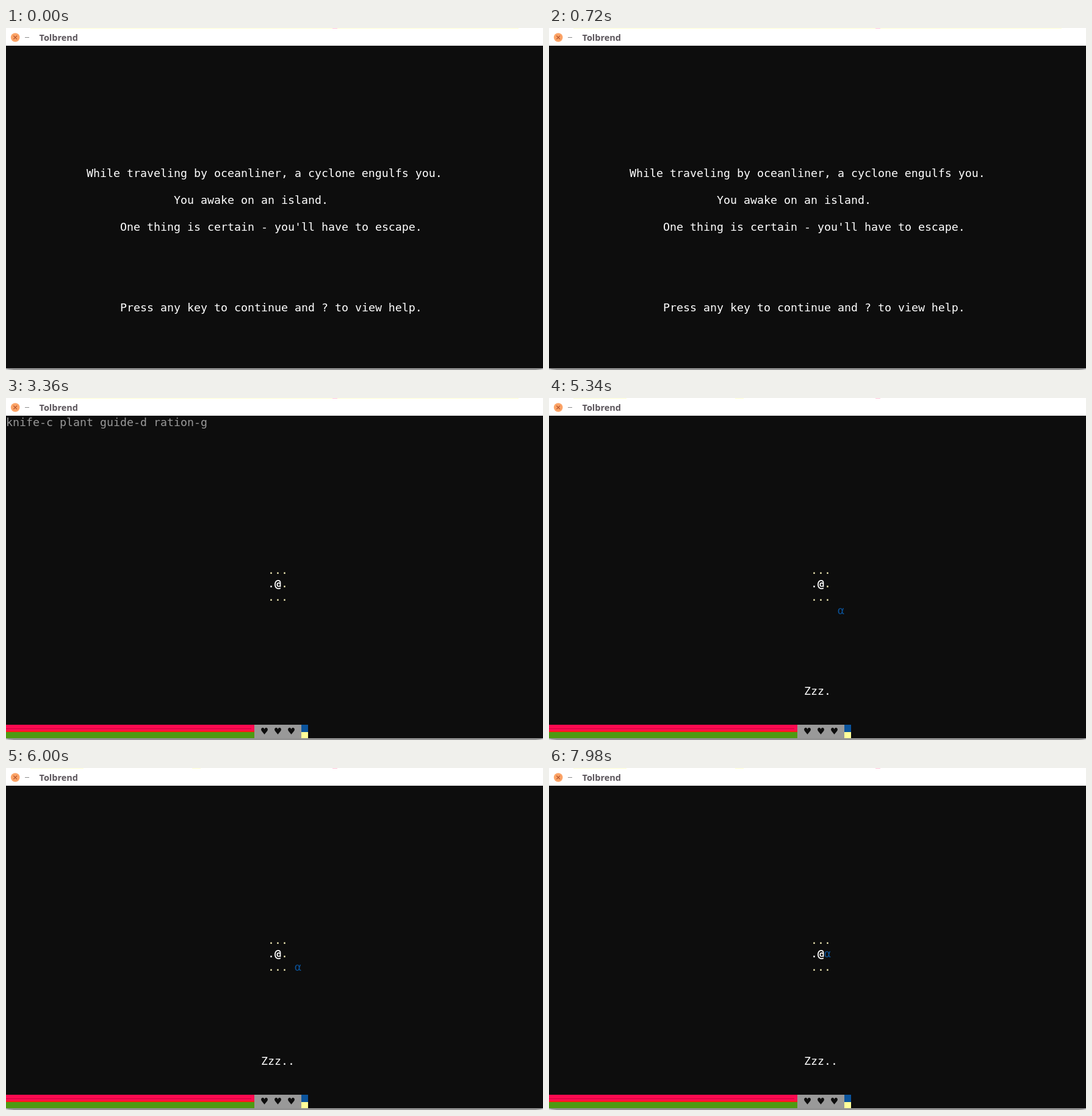
Write an HTML page that moves like this. It is 880 by 560 pixels and loops after 8 s.

```html
<!DOCTYPE html>
<html lang="en">
<head>
<meta charset="utf-8">
<title>Tolbrend</title>
<style>
  html, body { margin: 0; width: 100%; height: 100%; overflow: hidden; background: #0d0d0d; }
  svg { display: block; width: 880px; height: 560px; }
  .term text { font: 18.27px "DejaVu Sans Mono", monospace; fill: #fff; }
  .title { font: bold 14.5px "Open Sans", "Noto Sans", sans-serif; fill: #5b555b; }
</style>
</head>
<body>
<svg id="stage" viewBox="0 0 880 560">
  <rect width="880" height="560" fill="#0d0d0d"/>
  <g id="bar">
    <rect width="880" height="29" fill="#fff"/>
    <circle cx="15.2" cy="15.5" r="7.3" fill="#fca467"/>
    <path d="M12.3 12.6l5.8 5.8M18.1 12.6l-5.8 5.8" stroke="#b4532c" stroke-width="1.3"/>
    <rect x="31" y="15" width="7" height="1" fill="#8c8c8c"/>
    <text class="title" x="54.5" y="21">Tolbrend</text>
  </g>
  <g id="edge">
    <rect y="557" width="880" height="3" fill="#929292"/>
    <path d="M0 557.5Q3 559 13 560H0zM880 557.5Q877 559 868 560H880z" fill="#d0d0d0"/>
  </g>
  <g id="term" class="term"></g>
</svg>
<script>
const LOOP = 8000, CELL_W = 11, CELL_H = 22, TOP = 29;
const NS = "http://www.w3.org/2000/svg";
const term = document.getElementById("term");
const bar = document.getElementById("bar");
const SAND = "#f6efb8", SEA = "#0b5298";

function add(parent, tag, attrs = {}) {
  const el = document.createElementNS(NS, tag);
  for (const key in attrs) el.setAttribute(key, attrs[key]);
  return parent.appendChild(el);
}

function rect(parent, x, y, width, height, fill) {
  return add(parent, "rect", { x, y, width, height, fill });
}

function print(parent, col, row, str, fill = "#fff", weight = 400) {
  const el = add(parent, "text", { x: col * CELL_W, y: TOP + 17 + row * CELL_H });
  el.textContent = str;
  el.style.fill = fill;
  el.style.fontWeight = weight;
  return el;
}

// Visible only during [from, to), with hard cuts
function during(el, from, to = LOOP) {
  const frames = [{ offset: 0, opacity: from ? 0 : 1 }];
  if (from) frames.push({ offset: from / LOOP, opacity: 1 });
  if (to < LOOP) frames.push({ offset: to / LOOP, opacity: 0 });
  frames.push({ offset: 1, opacity: to < LOOP ? 0 : 1 });
  for (const f of frames) f.easing = "step-end";
  el.animate(frames, { duration: LOOP, iterations: Infinity }).startTime = start;
  return el;
}

const start = document.timeline.currentTime || 0;

// Sliver of the page above the window
const early = during(add(bar, "g"), 0, 3580);
rect(early, 40, 0, 800, 1, "#ffffce");
const late = during(add(bar, "g"), 3580);
rect(late, 40, 0, 87, 1, "#ffffce");
rect(late, 305, 0, 14, 1, "#ffffce");
rect(bar, 535, 0, 8, 1, "#ffc4d8");

const intro = during(add(term, "g"), 0, 3360);
print(intro, 12, 9, "While traveling by oceanliner, a cyclone engulfs you.");
print(intro, 25, 11, "You awake on an island.");
print(intro, 17, 13, "One thing is certain - you'll have to escape.");
print(intro, 17, 19, "Press any key to continue and ? to view help.");

const game = during(add(term, "g"), 3360);
for (const row of [11, 13]) print(game, 39, row, "...", SAND);
print(game, 39, 12, ".");
print(game, 40, 12, "@", "#fff", 700);
during(print(game, 41, 12, ".", SAND), 3360, 7980);

// Status row
rect(game, 0, 535, 407, 12, "#ff0a50");
rect(game, 0, 541, 402, 1, "#cc0340");
rect(game, 0, 545, 407, 2, "#fa1c14");
rect(game, 0, 547, 407, 10, "#4e9a12");
rect(game, 407, 535, 77, 22, "#999");
for (const col of [38, 40, 42]) print(game, col, 23, "♥", "#0d0d0d");
rect(game, 484, 535, 11, 12, "#0b549c");
rect(game, 484, 547, 11, 10, "#ffff99");

during(print(term, 0, 0, "knife-c plant guide-d ration-g", "#999"), 3360, 5340);

// col, row, from, to
const walk = [[43, 14, 5340, 6000], [43, 13, 6000, 7980], [41, 12, 7980]];
for (const [col, row, from, to] of walk) during(print(term, col, row, "α", SEA), from, to);

const snores = [["Zzz.", 5340, 6000], ["Zzz..", 6000, 7320], ["Zzz", 7320, 7980], ["Zzz..", 7980]];
for (const [str, from, to] of snores) during(print(term, 38, 20, str), from, to);
</script>
</body>
</html>
```
